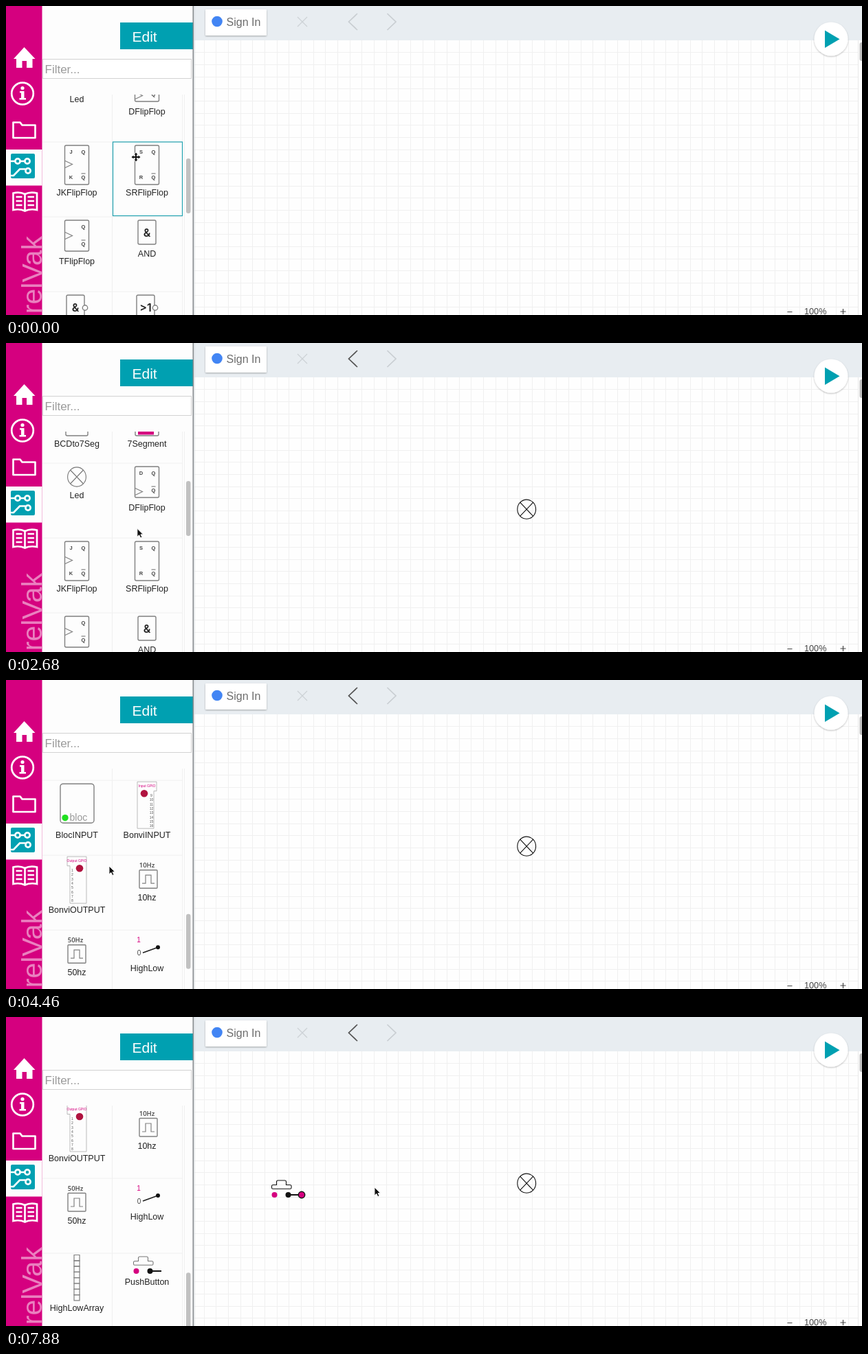
Recreate the animation shown at these times as an HTML page. Size 1245 px wide and 450 px high, loop 8 s.

```html
<!DOCTYPE html>
<html lang="en">
<head>
<meta charset="utf-8">
<title>Circuit editor</title>
<style>
  html, body { margin: 0; width: 100%; height: 100%; overflow: hidden; background: #fdfdfd; }
  svg { display: block; }
  text { font-family: "Liberation Sans", Arial, sans-serif; }
  .label { font-size: 12.5px; fill: #222; text-anchor: middle; }
  .pin { font-size: 7.5px; font-weight: bold; fill: #444; text-anchor: middle; }
  .sign { font: 600 16px Inter, sans-serif; fill: #222; text-anchor: middle; }
  .freq { font: 600 9.5px "Open Sans", sans-serif; fill: #444; text-anchor: middle; }
  .digit { font-size: 10px; fill: #444; text-anchor: middle; }
  .tiny { font-size: 5px; fill: #555; text-anchor: middle; }
  .hot { fill: #d5007f; }
  .part { fill: #fdfdfd; stroke: #808080; stroke-width: 1.4; }
  .line { fill: none; stroke: #808080; stroke-width: 1.2; }
  .thin { fill: none; stroke: #aaa; stroke-width: .8; }
  .rule { fill: none; stroke: #f0f0f0; }
  .box { fill: none; stroke: #22a3b1; stroke-width: 1.2; }
  .drawn { color: #111; }
  .ghost { color: #777; }
  .own { fill: none; stroke: currentColor; stroke-width: 1.1; }
  .white { fill: none; stroke: #fff; stroke-width: 2.7; }
</style>
</head>
<body>
<svg width="1245" height="450" viewBox="0 0 1245 450">
  <defs>
    <clipPath id="view"><rect x="53" y="129" width="208" height="321"/></clipPath>
    <clipPath id="rail"><rect width="52.5" height="450"/></clipPath>
    <filter id="soft" x="-20%" y="-20%" width="140%" height="150%">
      <feDropShadow dx="0" dy="1" stdDeviation="1.3" flood-opacity=".3"/>
    </filter>
    <g id="led">
      <ellipse class="own" rx="13.4" ry="14.1"/>
      <path class="own" d="M-9.5 -10L9.5 10M9.5 -10L-9.5 10"/>
    </g>
    <g id="button">
      <path class="own" d="M-2.5 -8.7Q-4 -8.7 -4 -10.5V-12.5Q-4 -14.5 -2 -14.5H3V-19Q3 -21 5 -21H15Q17 -21 17 -19V-14.5H22.5Q24.5 -14.5 24.5 -12.5V-10.5Q24.5 -8.7 23 -8.7Z"/>
      <path d="M20 0H36.5" stroke="#111" stroke-width="2"/>
      <circle class="hot" r="4"/>
      <circle cx="20" r="4" fill="#111"/>
    </g>
  </defs>

  <rect x="273" y="50" width="972" height="400" fill="#fefefe"/>
  <path id="grid" stroke="#f0f0f0"/>
  <path d="M1239.5 50V450" stroke="#e9e9e9"/>
  <rect x="1241.5" y="53" width="6" height="27" rx="3" fill="#bdbdbd"/>
  <rect x="273" width="972" height="50" fill="#e8edf1"/>
  <rect x="290" y="5" width="89" height="38" rx="1" fill="#fff" filter="url(#soft)"/>
  <circle cx="307" cy="22.5" r="7.8" fill="#4285f4"/>
  <text x="320.5" y="29" font-size="16" fill="#6c6c6c">Sign In</text>
  <path d="M424 16L438 30M438 16L424 30" stroke="#cdd2d6" stroke-width="1.3"/>
  <path id="undo" d="M511 11L498.500 23L511 35" fill="none" stroke-width="1.7"/>
  <path d="M554.500 11L567 23L554.500 35" fill="none" stroke="#c9ced2" stroke-width="1.7"/>
  <circle cx="1200" cy="48" r="24.5" fill="#fff" filter="url(#soft)"/>
  <path d="M1191 35.5L1212.500 48.2L1191 61Z" fill="#00a0b1"/>
  <text x="1161" y="449" font-size="12.7" fill="#444">100%</text>
  <path d="M1136.500 445.5H1143.500M1213.500 445H1221.500M1217.500 441V449" stroke="#444" stroke-width="1.2"/>

  <use id="led-main" class="drawn" href="#led" x="757.2" y="242.2"/>
  <g id="led-ghost" class="ghost"><rect class="box" x="-18" y="-18.5" width="36" height="37"/><use href="#led"/></g>
  <use id="btn-main" class="drawn" href="#button" x="390.5" y="259"/>
  <circle id="btn-pin" cx="430" cy="259" r="4.7" fill="#d5007f" stroke="#111" stroke-width="1.5"/>

  <rect x="53" width="219" height="450" fill="#fdfdfd"/>
  <rect x="166" y="24" width="106" height="39" fill="#00a0b1"/>
  <rect x="273" width="2" height="450" fill="#d9dde0" fill-opacity=".6"/>
  <rect x="271.5" width="1.5" height="450" fill="#858a8d"/>
  <text x="183.5" y="51.7" font-size="21" fill="#fff">Edit</text>
  <rect x="53.5" y="77.5" width="216" height="28" fill="#fff" stroke="#d2d2d2"/>
  <text x="56.5" y="97.7" font-size="17" fill="#9b9b9b">Filter...</text>

  <g clip-path="url(#view)">
    <path class="rule" d="M154.500 129V450M256.500 129V450M259.500 129V450"/>
    <g id="list"></g>
  </g>
  <rect id="thumb" x="262" width="6.5" height="80" rx="3.2" fill="#c1c1c1"/>

  <g clip-path="url(#rail)">
    <rect width="53" height="450" fill="#d5007f"/>
    <rect y="209" width="53" height="52.5" fill="#fdfdfd"/>
    <path d="M26.500 60L42.500 77H38.500V90H30V80H23.500V90H15V77H11Z" fill="#fff"/>
    <circle class="white" cx="24" cy="127.5" r="15.8"/>
    <path d="M20 124H26.500V134H29V136.500H19.500V134H22V126.500H20Z" fill="#fff"/>
    <circle cx="24" cy="119.5" r="2.6" fill="#fff"/>
    <path class="white" d="M10.500 192V169.500H20.500L23.500 173.500H42.500V192Z" stroke-linejoin="round"/>
    <rect x="7" y="215" width="35" height="36" rx="2" fill="#00a0b1"/>
    <g class="white">
      <circle cx="17" cy="226" r="3.6"/><circle cx="31" cy="226" r="3.6"/><circle cx="32" cy="240" r="3.6"/>
      <path d="M20.500 226H27.500M7 226H13.500M7 247H11L20 237.500H28.500"/>
    </g>
    <path class="white" d="M27.500 274Q20 270 10.500 272.500V297Q20 295 27.500 298.500Q35 295 45 297V272.500Q35 270 27.500 274V298M14.500 278H23.500M14.500 284H23.500M14.500 290H23.500M31.500 278H41M31.500 284H41M31.500 290H41"/>
    <text transform="translate(52 335) rotate(-90)" text-anchor="end" font-size="41" fill="#fff" fill-opacity=".5">orelVak</text>
  </g>

  <g id="btn-ghost" class="ghost"><rect class="box" x="-8" y="-25" width="51" height="33"/><use href="#button"/></g>
  <path id="arrow" d="M0 0V12L2.800 9.400L4.800 13.600L7 12.600L5 8.600H8.600Z" fill="#111" stroke="#fff" stroke-width=".9"/>
  <path id="move" d="M0 -6.500L2.500 -3.500H1V-1H3.500V-2.500L6.500 0L3.500 2.500V1H1V3.500H2.500L0 6.500L-2.500 3.500H-1V1H-3.500V2.500L-6.500 0L-3.500 -2.500V-1H-1V-3.500H-2.500Z" fill="#111" stroke="#fff" stroke-width="1.6" paint-order="stroke"/>
</svg>
<script>
const $ = id => document.getElementById(id);
const LOOP = 8000, STEP = 148.6, ROW = 109, GRID = 17.68;

let lines = "";
for (let x = 288; x < 1239; x += GRID) lines += `M${Math.floor(x) + .5} 50V450`;
for (let y = 50 + GRID; y < 450; y += GRID) lines += `M273 ${Math.floor(y) + .5}H1239`;
$("grid").setAttribute("d", lines);

// Palette parts: x from the column centre, y from the top of the row.
const text = (cls, x, y, s) => `<text class="${cls}" x="${x}" y="${y}">${s}</text>`;
const rect = (x, y, w, h, r = 2) => `<rect class="part" x="${x}" y="${y}" width="${w}" height="${h}" rx="${r}"/>`;
const path = (d, cls = "line") => `<path class="${cls}" d="${d}"/>`;
const dot = (x, y, r, fill) => `<circle cx="${x}" cy="${y}" r="${r}" fill="${fill}"/>`;
const use = (id, x, y) => `<use class="ghost" href="#${id}" x="${x}" y="${y}"/>`;
const label = (y, s) => text("label", 0, y, s);

function flipFlop(type, h, inputs, clock, base) {
  const tri = clock ? path(`M-17 ${clock - 5}L-6.500 ${clock}L-17 ${clock + 5}`) : "";
  return rect(-17.5, 5.5, 35, h) + tri +
    text("pin", -8.5, 17.5, inputs[0] || "") + text("pin", 9.5, 17.5, "Q") +
    text("pin", -8.5, h - 3, inputs[1] || "") + text("pin", 9.5, h - 3, "Q") +
    path(`M6.500 ${h - 10.5}H12.500`) + label(base, type + "FlipFlop");
}
function gate(name, sign, bubble) {
  const x = bubble ? -2 : 0;
  return rect(x - 13, 5.5, 26, 35) + text("sign", x, 29.5, sign) +
    (bubble ? `<circle class="part" cx="${x + 14}" cy="24" r="3.7"/>` : "") + label(58, name);
}
function board(dir, first, side) {
  let s = `<g transform="scale(${side} 1)">` + path("M-14 2.500H14V16H10V70.500H-14Z", "thin") + "</g>" +
    text("tiny hot", 0, 10.5, dir + " GPIO") + dot(-4 * side, 19.5, 5.3, "#b0123f");
  for (let i = 0; i < 8; i++) s += text("tiny", 6.5 * side, 24.5 + i * 6.3, first + i);
  return s + label(84.5, "Bonvi" + dir.toUpperCase());
}
const clock = (hz, x) => text("freq", x - 2, 18, hz + "Hz") + rect(x - 13, 22, 26, 26.5, 1) +
  path(`M${x - 9} 41.500H${x - 4}V29.500H${x + 4}V41.500H${x + 9}`) + label(66, hz + "hz");
const ladder = Array.from({ length: 8 }, (_, i) => path(`M-4 ${3 + i * 8.3}h8v8.3h-8Z`)).join("");

const rows = [
  [rect(-16, 14, 32, 55.5) + label(85, "BCDto7Seg"),
   rect(-17, 14, 34, 55.5) + path("M-13 62.500H10V68H-13Z", "hot") + label(85, "7Segment")],
  [use("led", 0, 20.5) + label(51, "Led"), flipFlop("D", 45, "D", 42, 69.5)],
  [flipFlop("JK", 57, "JK", 33, 78), flipFlop("SR", 57, "SR", 0, 78)],
  [flipFlop("T", 45, "", 28, 69), gate("AND", "&amp;")],
  [gate("NAND", "&amp;", true), gate("NOR", "&gt;1", true)],
  [`<g transform="translate(0 2)">${gate("NOT", "1", true)}</g>`, gate("OR", "&gt;1")],
  [rect(-24, 5.5, 49, 57, 4) + dot(-17, 55, 4.7, "#1fe01f") +
     '<text x="-10.5" y="59.5" font-size="14" fill="#999">bloc</text>' + label(84, "BlocINPUT"),
   board("Input", 9, 1)],
  [board("Output", 1, -1), clock(10, 2)],
  [clock(50, 0),
   text("digit hot", -12, 18.5, 1) + text("digit", -11.5, 37, 0) +
     '<path d="M-6 33.500L16 25.500" stroke="#222" stroke-width="1.7"/>' + dot(16, 25.5, 3, "#111") + label(60.5, "HighLow")],
  [ladder + label(84.5, "HighLowArray"), use("button", -15.5, 26.5) + label(46.5, "PushButton")]
];
$("list").innerHTML = rows.map((cells, r) =>
  `<g transform="translate(0 ${r * ROW})"><path class="rule" d="M53 .5H257"/>` +
  cells.map((c, i) => `<g transform="translate(${103 + i * 102} 0)">${c}</g>`).join("") + "</g>"
).join("") + '<rect id="hover" class="box" width="101" height="107.5"/>';

// Time is counted in refresh steps. A move is [first step, last step, ...goal], slowing to its goal.
function travel(n, start, ...moves) {
  return moves.reduce((pos, [a, b, ...goal]) => {
    const u = Math.min(1, Math.max(0, (n - a) / (b - a)));
    return pos.map((v, i) => v + (goal[i] - v) * u * (2 - u));
  }, start);
}
const scrollAt = n => travel(n, [-20.5], [0, 5, 65.5], [20.63, 27, -312], [27, 34, -603.5], [36, 39, -637.5])[0];
const cursorAt = n => travel(n, [189, 220],
  [0, 4, 150, 88], [4, 8, 114, 180],                       // scroll, then reach the lamp
  [8, 9, 506, 197], [9, 12, 744, 229],                     // drag it out
  [15, 19, 154, 273], [20, 21, 150, 271], [32, 34, 162, 306],
  [36, 40, 201, 368], [43, 44, 361, 236], [44, 51, 421, 249], // drag the push button
  [52, 53, 536, 248]);
const lampAt = n => travel(n, [114, 182], [8.02, 12, 749, 226]);
const buttonAt = n => travel(n, [190, 370], [43, 44, 350, 238], [44, 48, 390, 268]);

const within = (n, a, b) => n >= a && n < b;
const show = (id, on) => $(id).style.display = on ? "" : "none";
const place = (id, x, y) => $(id).setAttribute("transform", `translate(${x} ${y})`);

function hoverCell(n) {
  if (n < 1) return [1, 2];
  if (within(n, 6, 8)) return [0, 1];
  if (within(n, 40, 44)) return [1, 9];
}

function draw(now) {
  const n = Math.floor(now % LOOP / STEP);
  const top = scrollAt(n);
  place("list", 0, top);
  $("thumb").setAttribute("y", 217 - top * 0.2435);

  const cell = hoverCell(n);
  show("hover", cell);
  if (cell) place("hover", 53.5 + cell[0] * 102, cell[1] * ROW + 0.5);

  const moving = cell || n === 8;
  show("arrow", !moving);
  show("move", moving);
  place(moving ? "move" : "arrow", ...cursorAt(n));

  show("led-ghost", within(n, 9, 14));
  place("led-ghost", ...lampAt(n));
  show("led-main", n >= 14);
  $("undo").setAttribute("stroke", n >= 14 ? "#555" : "#c9ced2");

  show("btn-ghost", within(n, 44, 49));
  place("btn-ghost", ...buttonAt(n));
  show("btn-main", n >= 49);
  show("btn-pin", n >= 53);
}

function loop() {
  draw(performance.now());
  requestAnimationFrame(loop);
}
loop();
</script>
</body>
</html>
```
